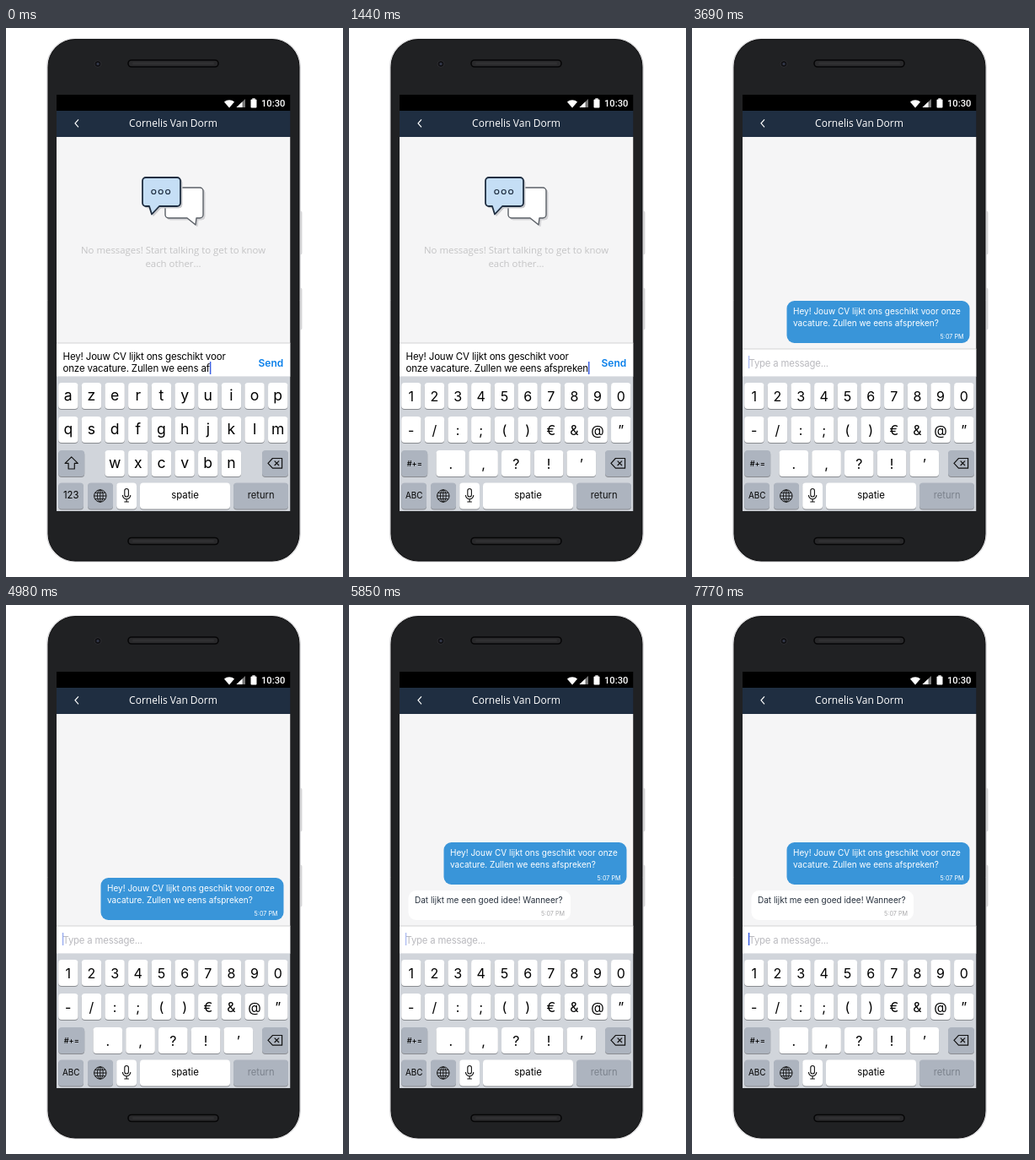
An HTML page with a canvas that plays this animation: 400 by 650 pixels, repeating every 7860 ms.

```html
<!DOCTYPE html>
<html lang="nl">
<head>
<meta charset="utf-8">
<title>Chat</title>
<style>
html, body { margin: 0; width: 100%; height: 100%; overflow: hidden; background: #fff; }
canvas { display: block; width: 400px; height: 650px; }
</style>
</head>
<body>
<canvas id="stage"></canvas>
<script>
const LOOP = 7860, STEP = 30;
const SWITCH = 1440, WRAP = 2070, SENT = 3300, REPLY = 5130;
const UI = 'Inter, "Liberation Sans", sans-serif';
const HEAD = '"Open Sans", "Noto Sans", sans-serif';
const NAVY = '#1f2e41', KEYS_TOP = 412.5;

// key, press time, release time
const PRESSES = [
  ['s', 30, 150], ['p', 360, 450], ['r', 510, 600], ['e', 660, 720],
  ['k', 810, 900], ['e', 960, 1050], ['n', 1170, 1260], ['?', 1890, 2040]
];

const canvas = document.getElementById('stage');
const ctx = canvas.getContext('2d');
const ratio = window.devicePixelRatio || 1;
canvas.width = 400 * ratio;
canvas.height = 650 * ratio;
ctx.scale(ratio, ratio);

const clamp = v => Math.max(0, Math.min(1, v));
const easeOut = v => 1 - Math.pow(1 - clamp(v), 3);

function box(x, y, w, h, color) {
  ctx.fillStyle = color;
  ctx.fillRect(x, y, w, h);
}

function round(x, y, w, h, r, fill, stroke, width = 1) {
  ctx.beginPath();
  ctx.roundRect(x, y, w, h, r);
  paint(fill, stroke, width);
}

function paint(fill, stroke, width = 1) {
  if (fill) { ctx.fillStyle = fill; ctx.fill(); }
  if (stroke) { ctx.strokeStyle = stroke; ctx.lineWidth = width; ctx.stroke(); }
}

function path(points, fill, stroke, width, close = true) {
  ctx.beginPath();
  points.forEach(([x, y]) => ctx.lineTo(x, y));
  if (close) ctx.closePath();
  paint(fill, stroke, width);
}

function circle(x, y, r, fill, stroke, width) {
  ctx.beginPath();
  ctx.arc(x, y, r, 0, Math.PI * 2);
  paint(fill, stroke, width);
}

function text(str, x, y, size, color, opt = {}) {
  ctx.font = `${opt.weight || 400} ${size}px ${opt.font || UI}`;
  ctx.textAlign = opt.align || 'left';
  ctx.letterSpacing = (opt.spacing || 0) + 'px';
  ctx.fillStyle = color;
  ctx.fillText(str, x, y);
  return ctx.measureText(str).width;
}

const center = (str, x, y, size, color, opt) =>
  text(str, x, y, size, color, { align: 'center', ...opt });

function drawPhone() {
  box(0, 0, 400, 650, '#fff');
  round(347, 217, 4, 51, 1.5, '#dcdcdd', '#c2c2c4', 0.6);
  round(347, 308, 4, 49, 1.5, '#dcdcdd', '#c2c2c4', 0.6);
  round(48.5, 12.5, 301, 619.5, 33, '#e3e3e4', '#cfcfd1', 0.7);
  round(50, 13.5, 298, 617.5, 32, '#202123', '#0d0d0e', 1);
  for (const y of [38, 603.5]) {
    round(145, y, 107, 8, 4, '#29292b', '#060607', 1.6);
    round(150, y + 2.5, 97, 3, 1.5, '#303032');
  }
  circle(109, 42.5, 4, '#111114', '#2d2d31', 1);
  circle(109, 42.5, 1.6, '#343a4c');
}

function drawBars() {
  box(60, 79, 277.5, 19, '#000');
  ctx.beginPath();
  ctx.moveTo(265, 94.5);
  ctx.arc(265, 94.5, 9.2, -Math.PI * 0.73, -Math.PI * 0.27);
  ctx.closePath();
  paint('#fff');
  path([[273.5, 94], [284, 94], [284, 84]], '#777');
  path([[273.5, 94], [280.5, 94], [280.5, 87.3]], '#fff');
  round(290.5, 84.5, 7, 10, 1, '#fff');
  box(292.3, 83.3, 3.4, 1.5, '#fff');
  text('10:30', 303, 93.2, 11.2, '#fff', { weight: 500, font: 'Roboto, sans-serif' });
  box(60, 98, 277.5, 31, NAVY);
  path([[86, 108.3], [82, 112.8], [86, 117.3]], null, '#fff', 1.2, false);
  center('Cornelis Van Dorm', 198.5, 117, 12, '#fff', { font: HEAD });
}

function speech(x, y, w, h, tail, fill, stroke, width) {
  const r = 4, b = y + h, e = x + w;
  ctx.beginPath();
  ctx.moveTo(x + r, y);
  ctx.arcTo(e, y, e, b, r);
  ctx.arcTo(e, b, x, b, r);
  tail.forEach(([px, py]) => ctx.lineTo(px, py));
  ctx.arcTo(x, b, x, y, r);
  ctx.arcTo(x, y, e, y, r);
  ctx.closePath();
  ctx.lineJoin = 'round';
  paint(fill, stroke, width);
}

function drawEmpty() {
  const back = [[226, 225], [225, 233], [215, 225]];
  const front = [[182, 211], [173, 220.5], [170, 211]];
  const shift = list => list.map(([x, y]) => [x + 2, y + 2]);
  speech(191, 191, 45, 36, shift(back), '#d3d3d6', '#d3d3d6', 1);
  speech(189, 189, 45, 36, back, '#fff', '#5b6067', 1.4);
  speech(164, 179, 45, 34, shift(front), '#c9cacd', '#c9cacd', 1);
  speech(162, 177, 45, 34, front, '#c5def5', NAVY, 1.8);
  for (const x of [175.3, 183.7, 192.1]) circle(x, 194, 2.5, null, NAVY, 1.2);
  const opt = { font: HEAD };
  center('No messages! Start talking to get to know', 198.5, 267, 11.4, '#c4c4c5', opt);
  center('each other...', 198.5, 283, 11.4, '#c4c4c5', opt);
}

function drawMessages(t) {
  const enter = 50 * (1 - easeOut((t - SENT + STEP) / 180));
  const reply = t < REPLY ? 0 : easeOut((t - REPLY + STEP) / 210);
  const y = 323 + enter - 42 * reply;
  round(112.5, y, 217, 50, 9, '#3995d9');
  text('Hey! Jouw CV lijkt ons geschikt voor onze', 120, y + 15.5, 10, '#fff');
  text('vacature. Zullen we eens afspreken?', 120, y + 30.2, 10, '#fff');
  text('5:07 PM', 322.5, y + 44.7, 7.2, '#fff', { align: 'right' });
  if (reply) {
    const top = 380 - 42 * reply;
    round(70.5, top, 192.5, 35, 9, '#fff');
    text('Dat lijkt me een goed idee! Wanneer?', 78, top + 15.2, 10, '#26303d');
    text('5:07 PM', 256, top + 29.8, 7.2, '#a9a9ab', { align: 'right' });
  }
}

function blink(t) {
  if (t < 2100) return 1;
  const origin = t < SENT ? 2880 : 4890;
  const p = (t - origin + LOOP * 890) % 890;
  if (p < 180) return p / 180;
  return p < 470 ? 1 : clamp(1 - (p - 470) / 180);
}

function drawCursor(x, y, t) {
  ctx.globalAlpha = blink(t);
  box(x, y, 1.5, 15, '#3b5fe2');
  ctx.globalAlpha = 1;
}

function drawInput(t) {
  const top = t < WRAP ? 373 : t < SENT ? 358.5 : 380;
  box(60, top, 277.5, KEYS_TOP - top, '#fff');
  box(60, top - 0.5, 277.5, 1, '#d4d4d6');
  const opt = { spacing: -0.16 };
  if (t >= SENT) {
    text('Type a message...', 67.5, 400.5, 11.3, '#b9b9be', opt);
    drawCursor(66.8, 388, t);
    return;
  }
  const typed = 'af' + PRESSES.filter(k => t >= k[2]).map(k => k[0]).join('');
  const lines = ['Hey! Jouw CV lijkt ons geschikt voor', 'onze vacature. Zullen we eens'];
  if (t < WRAP) lines[1] += ' ' + typed.replace('?', '');
  else lines.push(typed);
  let width = 0;
  lines.forEach((line, i) => {
    width = text(line, 67.5, 406.5 - 14 * (lines.length - 1 - i), 11.5, '#000', opt);
  });
  drawCursor(67.5 + width, 395, t);
  text('Send', 299.5, 401.2, 12, '#0b80ea', { weight: 600 });
}

function keyCap(x, y, w, dark) {
  round(x, y + 1, w, 31, 4, '#898c91');
  round(x, y, w, 31, 4, dark ? '#adb4bf' : '#fff');
}

// Visible character keys with their middle, top and width
function layout(numeric) {
  const keys = [];
  const row = (chars, x, gap, y, w) =>
    [...chars].forEach((c, i) => keys.push({ c, x: x + gap * i, y, w }));
  const [r1, r2, r3] = numeric ? ['1234567890', '-/:;()€&@”', '.,?!’'] : ['azertyuiop', 'qsdfghjklm', 'wxcvbn'];
  row(r1, 73.8, 27.66, 420, 23.4);
  row(r2, 73.8, 27.66, 460, 23.4);
  if (numeric) row(r3, 120.8, 38.75, 500, 34.6);
  else row(r3, 129.1, 27.66, 500, 23.4);
  return keys;
}

function drawPopup(key) {
  const { c, x, y, w } = key;
  const half = w / 2, wide = Math.max(22, half + 7);
  const mid = Math.max(61 + wide, Math.min(336.5 - wide, x));
  const l = mid - wide, r = mid + wide, top = y - 48, neck = y - 12, end = y + 31;
  ctx.save();
  ctx.shadowColor = 'rgba(0,0,0,.35)';
  ctx.shadowBlur = 3 * ratio;
  ctx.shadowOffsetY = ratio;
  ctx.beginPath();
  ctx.moveTo(l + 8, top);
  ctx.arcTo(r, top, r, neck, 8);
  ctx.lineTo(r, neck - 8);
  ctx.bezierCurveTo(r, neck + 3, x + half, neck, x + half, neck + 14);
  ctx.arcTo(x + half, end, x, end, 4);
  ctx.arcTo(x - half, end, x - half, neck, 4);
  ctx.lineTo(x - half, neck + 14);
  ctx.bezierCurveTo(x - half, neck, l, neck + 3, l, neck - 8);
  ctx.arcTo(l, top, r, top, 8);
  ctx.closePath();
  paint('#fff');
  ctx.restore();
  center(c, mid, top + 30, 27, '#000');
}

function drawIcons(numeric) {
  if (numeric) center('#+=', 77.7, 519, 9.2, '#000', { weight: 500 });
  else path([[77.7, 507.8], [85.3, 515.4], [81.3, 515.4], [81.3, 522], [74.1, 522],
    [74.1, 515.4], [70.1, 515.4]], null, '#111', 1.2);
  path([[311, 515.3], [316.4, 509.5], [327.6, 509.5], [327.6, 521.2], [316.4, 521.2]],
    null, '#111', 1.2);
  path([[318.7, 512.7], [324, 518]], null, '#111', 1.2, false);
  path([[324, 512.7], [318.7, 518]], null, '#111', 1.2, false);

  circle(111.8, 554, 7.2, null, '#111', 1);
  ctx.beginPath();
  ctx.ellipse(111.8, 554, 3.4, 7.2, 0, 0, Math.PI * 2);
  paint(null, '#111', 0.9);
  path([[111.8, 546.8], [111.8, 561.2]], null, '#111', 0.9, false);
  for (const [dy, w] of [[-3.6, 6.1], [0, 7.2], [3.6, 6.1]])
    path([[111.8 - w, 554 + dy], [111.8 + w, 554 + dy]], null, '#111', 0.9, false);

  round(140.8, 545.5, 4.6, 9.5, 2.3, null, '#111', 1.1);
  ctx.beginPath();
  ctx.arc(143.1, 553, 4.7, 0, Math.PI);
  paint(null, '#111', 1.1);
  path([[143.1, 557.7], [143.1, 561]], null, '#111', 1.1, false);
  path([[140.3, 561], [145.9, 561]], null, '#111', 1.1, false);
}

function drawKeyboard(t) {
  const numeric = t >= SWITCH;
  const keys = layout(numeric);
  box(60, KEYS_TOP, 277.5, 572 - KEYS_TOP, '#d1d5db');
  for (const k of keys) {
    keyCap(k.x - k.w / 2, k.y, k.w);
    center(k.c, k.x, k.y + (numeric ? 21.8 : 21), numeric ? 16 : 17.6, '#000');
  }
  keyCap(62.2, 500, 31, true);
  keyCap(304, 500, 31, true);
  const bottom = 538.5;
  keyCap(62.2, bottom, 29.8, true);
  keyCap(97, bottom, 30, true);
  keyCap(131.2, bottom, 23.8);
  keyCap(159, bottom, 107);
  keyCap(270, bottom, 65, true);
  center(numeric ? 'ABC' : '123', 77.2, 557.3, numeric ? 9.9 : 11.3, '#000');
  center('spatie', 212.5, 557.3, 11.4, '#000');
  center('return', 302.7, 557.3, 11.2, t < SENT ? '#111' : '#7b828c');
  drawIcons(numeric);

  const press = PRESSES.find(k => t >= k[1] && t < k[2]);
  if (press) drawPopup(keys.find(k => k.c === press[0]));
}

function draw(t) {
  drawPhone();
  ctx.save();
  ctx.beginPath();
  ctx.rect(60, 79, 277.5, 493);
  ctx.clip();
  box(60, 129, 277.5, 284, '#f5f5f6');
  if (t < SENT) drawEmpty();
  else drawMessages(t);
  drawBars();
  drawInput(t);
  drawKeyboard(t);
  ctx.restore();
}

const start = performance.now();
function tick() {
  const t = (performance.now() - start) % LOOP;
  draw(Math.floor(t / STEP) * STEP);
  requestAnimationFrame(tick);
}
tick();
</script>
</body>
</html>
```
